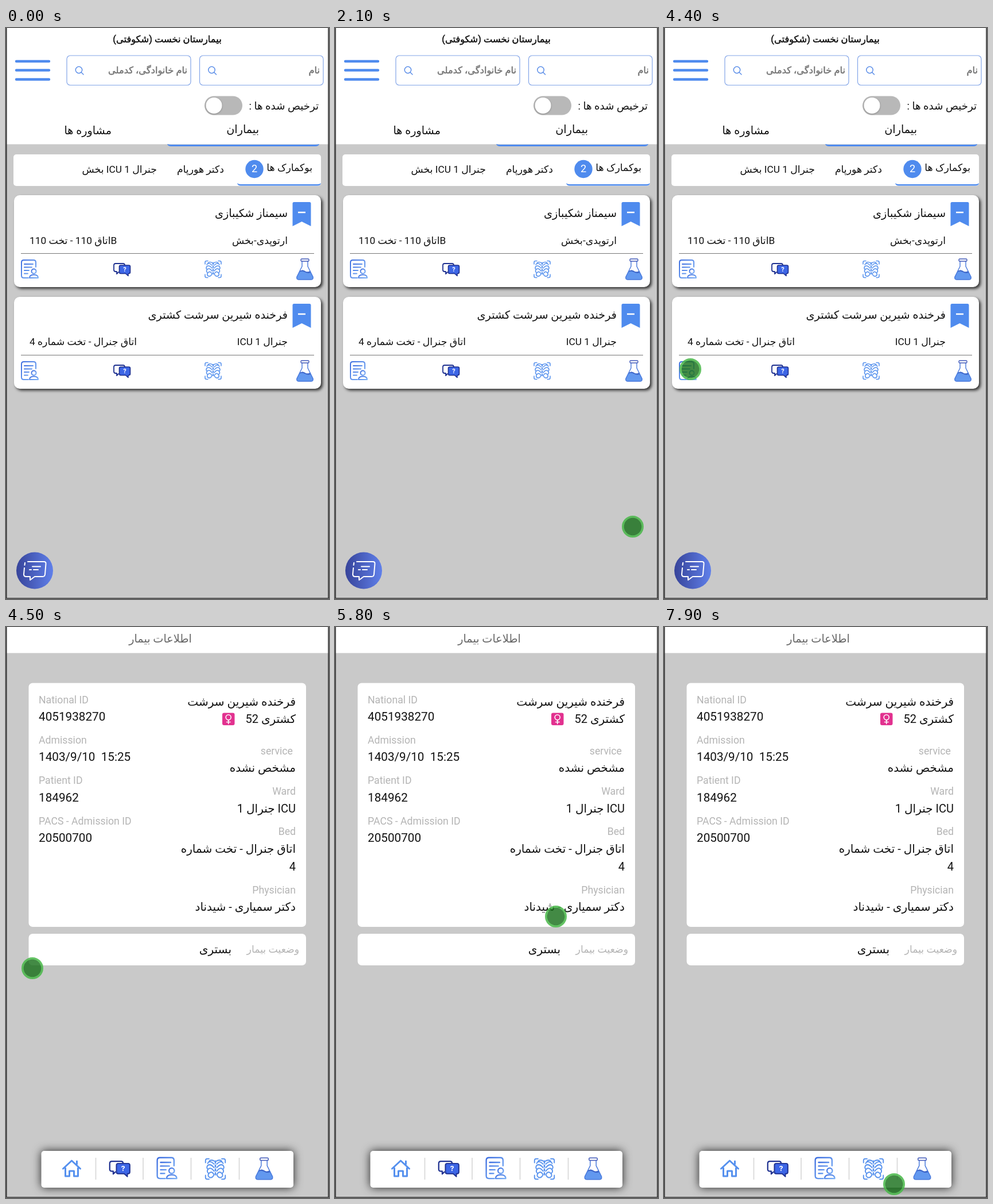
Recreate the animation shown at these times as an HTML page. Size 563 by 994 pixels, loop 8000 ms.

```html
<!DOCTYPE html>
<html lang="fa">
<head>
<meta charset="utf-8">
<title>Patient list</title>
<style>
  html, body { margin: 0; width: 100%; height: 100%; overflow: hidden; background: #c9c9c9; }
  svg.stage { display: block; width: 100vw; height: 100vh; }
  text { font-family: Roboto, "DejaVu Sans", sans-serif; fill: #111; white-space: pre; }
  .fa { direction: rtl; }
  .left { text-anchor: end; }
  .mid { text-anchor: middle; }
  .semi { font-size: 16.3px; stroke: #111; stroke-width: .5px; }
  .s17 { font-size: 17.3px; }
  .s18 { font-size: 18.2px; }
  .s19 { font-size: 19.2px; }
  .s20 { font-size: 20px; }
  .num { font-size: 20.7px; }
  .label { font-size: 17.7px; fill: #b4b4b4; }
  .hint { fill: #757575; stroke: #757575; }
  .card { fill: #fff; filter: drop-shadow(3px 3px 2.5px #333); }
  .nav { fill: #fff; filter: drop-shadow(0 0 8px #222); }
  .knob { fill: #fff; filter: drop-shadow(0 1px 1.5px #888); }
  .line { fill: none; stroke-linecap: round; stroke-linejoin: round; }
  .list { animation: list 8s step-end infinite; }
  .detail { animation: detail 8s step-end infinite; }
  .cursor { animation: move 8s linear infinite, show 8s step-end infinite; }
  @keyframes list { 0% { visibility: visible } 56.25%, 100% { visibility: hidden } }
  @keyframes detail { 0% { visibility: hidden } 56.25%, 100% { visibility: visible } }
  @keyframes show { 0% { visibility: hidden } 25%, 100% { visibility: visible } }
  @keyframes move {
    0%, 25% { transform: translate(530px, 878px) }
    26.25%, 32% { transform: translate(519px, 868px); animation-timing-function: ease-in }
    41.25% { transform: translate(212px, 719px); animation-timing-function: ease-out }
    46%, 63.5% { transform: translate(46px, 594px); animation-timing-function: ease-in-out }
    72.5%, 86% { transform: translate(385px, 504px); animation-timing-function: ease-in-out }
    98.75%, 100% { transform: translate(401px, 970px) }
  }
</style>
</head>
<body>
<svg class="stage" viewBox="0 0 563 994" preserveAspectRatio="none">
  <defs>
    <linearGradient id="blue" x1="0" y1="0" x2="1" y2="1">
      <stop stop-color="#3f6fe0"/><stop offset="1" stop-color="#7db2f7"/>
    </linearGradient>
    <linearGradient id="fab">
      <stop stop-color="#37449a"/><stop offset="1" stop-color="#6080ea"/>
    </linearGradient>

    <!-- icons are centred on the origin -->
    <g id="doc" class="line" stroke="url(#blue)" stroke-width="2">
      <path d="M-2 15H-10Q-14 15 -14 11V-12Q-14 -16 -10 -16H7Q11 -16 11 -12V-4"/>
      <path d="M-9 -9H6M-9 -3.5H4M-9 2H-1M-9 7.5H-3"/>
      <circle cx="7.5" cy="3.5" r="4"/>
      <path d="M0 15Q0 9.5 7.5 9.5T15 15Z"/>
    </g>
    <g id="chat">
      <path class="line" stroke="#1f3190" stroke-width="1.8" d="M-6 5L-9 8V4H-11Q-14 4 -14 1V-7Q-14 -10 -11 -10H2Q5 -10 5 -7"/>
      <path fill="#3d66e6" stroke="#1f3190" stroke-width="1.6" stroke-linejoin="round" d="M-2 -7H12Q14.5 -7 14.5 -4.5V5Q14.5 7.5 12 7.5H11V11.5L6.500 7.500H-2Q-4.500 7.500 -4.500 5V-4.500Q-4.500 -7 -2 -7Z"/>
      <text class="mid" x="5" y="4" font-size="11" font-weight="700" style="fill:#fff">?</text>
    </g>
    <g id="half" class="line">
      <path d="M-14 -9V-12Q-14 -14.500 -11.500 -14.500H-9M-14 9V12Q-14 14.500 -11.500 14.500H-9"/>
      <path d="M-2 -7Q-8 -13 -11 -8M-2 -2Q-7 -8 -11 -5Q-13 -2 -11 0M-2 3Q-6 -3 -10 0Q-13 3 -10 6M-2 8Q-5 2 -9 6Q-12 10 -8 12Q-4 13 -2 8M-1 -11Q-6 -14 -9 -11"/>
    </g>
    <g id="ribs" stroke="#5c95ee" stroke-width="1.6">
      <use href="#half"/><use href="#half" transform="scale(-1 1)"/>
      <path class="line" d="M0 -11V10" stroke-width="2.2" stroke-dasharray="2.5 3"/>
    </g>
    <g id="flask">
      <path fill="#6298ef" d="M-9 3Q-4 0 0 3T9 3L14 13Q15 18 11 18H-11Q-15 18 -14 13Z"/>
      <path fill="#3f66c8" d="M-9 3Q-4 0 0 3T9 3L10 6Q5 8 0 5T-10 5Z"/>
      <path class="line" stroke="#4778dc" stroke-width="1.4" d="M-5 -14V-5L-14 13Q-15 18 -11 18H11Q15 18 14 13L5 -5V-14"/>
      <rect x="-7" y="-18" width="14" height="4" rx="1.5" fill="#fff" stroke="#4058b8" stroke-width="1.4"/>
    </g>
    <g id="home" class="line" stroke="#5590ee" stroke-width="3">
      <path d="M-15 1L0 -13L15 1M9 -7V-12M-11 -1V14H-4V5H4V14H11V-1"/>
    </g>
    <g id="search" class="line" stroke="#5a8de8" stroke-width="1.5">
      <circle r="5.7"/><path d="M4 4L8 8"/>
    </g>
    <g id="row">
      <rect class="card" x="14" y="291" width="535" height="160" rx="10"/>
      <path fill="#4f8bee" d="M502 303H529Q531.500 303 531.500 305.500V345L515.500 337L499.500 345V305.500Q499.500 303 502 303Z"/>
      <path d="M509 321H522" stroke="#fff" stroke-width="2.5"/>
      <path d="M26 392.500H537" stroke="#777"/>
      <use href="#doc" x="41" y="420"/>
      <use href="#chat" x="202" y="420"/>
      <use href="#ribs" x="361" y="420"/>
      <use href="#flask" x="521" y="420"/>
    </g>
  </defs>

  <rect width="563" height="994" fill="#c9c9c9"/>

  <g class="list">
    <rect width="563" height="202" fill="#fff"/>
    <path d="M0 202.500H563" stroke="#ddd"/>
    <text class="fa mid semi" x="281" y="25">بیمارستان نخست (شکوفتی)</text>
    <path class="line" stroke="#4f8bee" stroke-width="4.400" d="M18 58H75M18 73.500H75M18 89.500H75"/>
    <g fill="#fff" stroke="#83a5e8" stroke-width="1.2">
      <rect x="106" y="48" width="216" height="51.500" rx="6"/>
      <rect x="337.500" y="48" width="215.500" height="51.500" rx="6"/>
    </g>
    <use href="#search" x="127" y="73"/>
    <use href="#search" x="358.500" y="73"/>
    <text class="fa semi hint" x="316" y="79">نام خانوادگی، کدملی</text>
    <text class="fa semi hint" x="547" y="79">نام</text>

    <text class="fa s18" x="545" y="142">ترخیص شده ها :</text>
    <rect x="346" y="118.500" width="66" height="33" rx="16.500" fill="#b8b8b8"/>
    <circle class="knob" cx="362.500" cy="135" r="14"/>

    <text class="fa s19" x="441" y="183">بیماران</text>
    <text class="fa s19" x="184" y="185">مشاوره ها</text>
    <path fill="#4f8bee" d="M281 202Q284 203 288 203H539Q543 203 546 202Q545 206 539 206H288Q282 206 281 202Z"/>

    <rect x="13" y="220" width="536" height="55" rx="5" fill="#fff"/>
    <path fill="#4f8bee" d="M403 270Q405 272 409 272H543Q547 272 549 270Q548 274.500 543 274.500H409Q404 274.500 403 270Z"/>
    <text class="fa s17" x="534" y="249">بوکمارک ها</text>
    <circle cx="433" cy="245.500" r="15.700" fill="#4f8bee"/>
    <text class="mid s18" x="433" y="251" style="fill:#fff">2</text>
    <text class="fa s17" x="380" y="252">دکتر هورپام</text>
    <text class="fa s17" x="263" y="252">جنرال ICU 1 بخش</text>

    <use href="#row"/>
    <text class="fa s19" x="491" y="329">سیمناز شکیبازی</text>
    <text class="fa s17" x="491" y="376">ارتوپدی-بخش</text>
    <text class="fa left s17" x="41" y="376">Bاتاق 110 - تخت 110</text>

    <use href="#row" y="177"/>
    <text class="fa s19" x="491" y="506">فرخنده شیرین سرشت کشتری</text>
    <text class="fa s17" x="491" y="552">جنرال ICU 1</text>
    <text class="fa left s17" x="41" y="552">اتاق جنرال - تخت شماره 4</text>

    <circle cx="50" cy="944.500" r="32" fill="url(#fab)"/>
    <g class="line" stroke="#fff" stroke-width="2">
      <path d="M38 929H66Q70 929 69.500 933L68 951Q67.500 955 64 955H50L42 961V955H35Q31 955 31 951L32 940M33 931L32.500 935"/>
      <path d="M46 937.500H60M41 943H44M48 943H56"/>
    </g>
  </g>

  <g class="detail">
    <rect width="563" height="45" fill="#fff"/>
    <path d="M0 45.500H563" stroke="#ddd"/>
    <text class="fa mid s19" x="269" y="27" style="fill:#666">اطلاعات بیمار</text>
    <g fill="#fff">
      <rect x="39.500" y="97.500" width="483.500" height="424.500" rx="7"/>
      <rect x="39.500" y="534" width="483.500" height="55" rx="7"/>
    </g>

    <text class="label" x="57" y="133">National ID</text>
    <text class="num" x="57" y="163">4051938270</text>
    <text class="label" x="57" y="203">Admission</text>
    <text class="num" x="57" y="233">1403/9/10  15:25</text>
    <text class="label" x="57" y="273">Patient ID</text>
    <text class="num" x="57" y="303.500">184962</text>
    <text class="label" x="57" y="343.500">PACS - Admission ID</text>
    <text class="num" x="57" y="373.500">20500700</text>

    <text class="fa s20" x="505" y="137">فرخنده شیرین سرشت</text>
    <text class="fa s20" x="505" y="167">کشتری 52</text>
    <rect x="377" y="149.500" width="21.500" height="21.500" rx="3" fill="#e2318f"/>
    <g class="line" stroke="#fff" stroke-width="1.6">
      <circle cx="387.700" cy="157.300" r="4.500"/><path d="M387.700 162V168.500M384.500 165.500H391"/>
    </g>
    <text class="label" x="500" y="222" text-anchor="end">service</text>
    <text class="fa s20" x="505" y="252">مشخص نشده</text>
    <text class="label" x="505" y="292" text-anchor="end">Ward</text>
    <text class="fa s20" x="505" y="323">ICU جنرال 1</text>
    <text class="label" x="505" y="362" text-anchor="end">Bed</text>
    <text class="fa s20" x="505" y="393">اتاق جنرال - تخت شماره</text>
    <text class="fa s20" x="505" y="424">4</text>
    <text class="label" x="505" y="464" text-anchor="end">Physician</text>
    <text class="fa s20" x="505" y="494">دکتر سمیاری - شیدناد</text>
    <text class="fa s17" x="511" y="567" style="fill:#b4b4b4">وضعیت بیمار</text>
    <text class="fa s20" x="393" y="568">بستری</text>

    <rect class="nav" x="61.500" y="912" width="439.500" height="64" rx="5"/>
    <path d="M156.500 924V962M239 924V962M322.500 924V962M406.500 924V962" stroke="#d4d4d4" stroke-width="1.500"/>
    <use href="#home" x="114.500" y="942"/>
    <use href="#chat" transform="translate(198 942.500) scale(1.230)"/>
    <use href="#doc" transform="translate(280 942.500) scale(1.170)"/>
    <use href="#ribs" transform="translate(365 943.500) scale(1.230)"/>
    <use href="#flask" transform="translate(450 943) scale(1.040)"/>
  </g>

  <path d="M.75 0V993M562 0V993M0 992.800H563" stroke="#333" stroke-width="1.600" fill="none"/>

  <g class="cursor">
    <circle r="17" fill="none" stroke="#48b848" stroke-width="4" stroke-opacity=".85"/>
    <circle r="15.300" fill="#1a701c" fill-opacity=".82"/>
  </g>
</svg>
</body>
</html>
```
